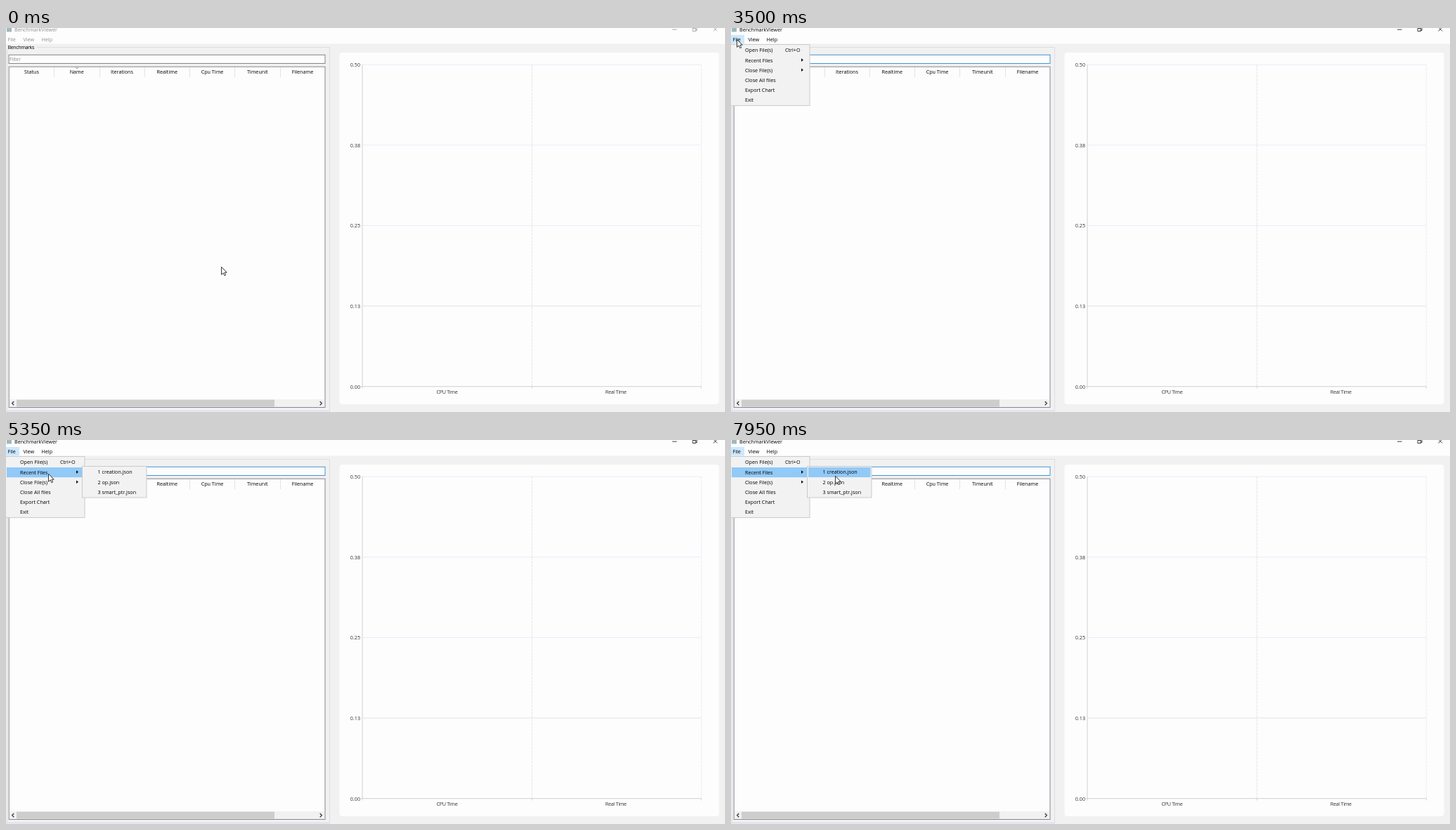
An HTML page that plays this animation: 1023 by 547 pixels, repeating every 8 s.

```html
<!DOCTYPE html>
<html lang="en">
<head>
<meta charset="utf-8">
<title>Benchmark window</title>
<style>
html, body { margin: 0; width: 100%; height: 100%; overflow: hidden; background: #f1f1f1; }
svg { display: block; width: 1023px; height: 547px; }
text { font: 7.2px "Open Sans", "Noto Sans", sans-serif; fill: #000; white-space: pre; }
.axis text { fill: #333; }
.mid { text-anchor: middle; }
</style>
</head>
<body>
<svg id="stage" viewBox="0 0 1023 547"></svg>
<script>
const NS = "http://www.w3.org/2000/svg";
const LOOP = 8000;
const stage = document.getElementById("stage");

function add(parent, tag, attrs, content) {
  const el = document.createElementNS(NS, tag);
  for (const key in attrs) el.setAttribute(key, attrs[key]);
  if (content) el.textContent = content;
  parent.appendChild(el);
  return el;
}
const group = (attrs = {}, parent = stage) => add(parent, "g", attrs);
const rect = (p, x, y, width, height, fill, more = {}) =>
  add(p, "rect", { x, y, width, height, fill, ...more });
const path = (p, d, stroke, more = {}) =>
  add(p, "path", { d, stroke, fill: "none", "stroke-width": 1, ...more });
const label = (p, x, y, text, more = {}) => add(p, "text", { x, y, ...more }, text);
const show = (el, on) => el.setAttribute("visibility", on ? "visible" : "hidden");

// Title bar and menu bar
rect(stage, 0, 0, 1023, 547, "#f1f1f1");
rect(stage, 0, 0, 1023, 22.5, "#fdfdfe");
const fileTab = rect(stage, 0, 10, 19, 12.5, "#cce8ff");
rect(stage, 1, 0, 7, 5.5, "#9fb9ba");
const barTexts = [
  label(stage, 12, 5, "BenchmarkViewer"),
  label(stage, 2.5, 19, "File"),
  label(stage, 24.5, 19, "View"),
  label(stage, 50.5, 19, "Help")
];
const buttons = path(stage,
  "M948 2.2h6.5M977 .5h4.5v4h-4.5zM978.5 .5v-1.5h4.5v4.5h-1.5M1006.5 -1l5.5 5.5M1012 -1l-5.5 5.5",
  "#999", { "stroke-width": .8 });

// Benchmark list
path(stage, "M44 27.5H460.5V545M1.5 30V545", "#dedee2");
path(stage, "M0 545.5H461", "#dcdcee", { "stroke-width": 1.5 });
label(stage, 2.5, 30.2, "Benchmarks", { "letter-spacing": "-.43" });
const field = rect(stage, 4, 38.3, 450, 12.2, "#fdfdfe");
label(stage, 5, 47.2, "Filter", { style: "fill:#8b8b8b;font-size:6.8px" });
rect(stage, 4.2, 55.2, 449.8, 485.3, "#fdfdfe", { stroke: "#858990" });
["Status", "Name", "Iterations", "Realtime", "Cpu Time", "Timeunit", "Filename"].forEach((name, i) => {
  const x = 36.5 + i * 64.25;
  label(stage, x, 65.2, name, { class: "mid" });
  if (i) path(stage, `M${Math.round(x - 32.5) + .5} 56V70`, "#e3e3e5");
});
path(stage, "M99 56.2l2 1.6l2 -1.6", "#777", { "stroke-width": .8 });
rect(stage, 5, 529, 448, 11, "#f1f1f1");
rect(stage, 15, 529.5, 367, 10, "#cdcdcd");
path(stage, "M11.3 532l-2.6 2.6l2.6 2.6M446.7 532l2.6 2.6l-2.6 2.6", "#333", { "stroke-width": 1.3 });

// Chart
rect(stage, 474.5, 35, 540, 501, "#fdfdfe", { rx: 4 });
const chart = group({ class: "axis" });
["0.50", "0.38", "0.25", "0.13", "0.00"].forEach((value, i) => {
  const y = 52.2 + i * 114.6;
  if (i < 4) path(chart, `M507 ${y}H989`, i === 3 ? "#e2e2e6" : "#ebebf8");
  label(chart, 504, y + 2.9, value, { "text-anchor": "end" });
});
path(chart, "M748.3 52V511", "#ebe7d6", { "stroke-dasharray": "4 1" });
path(chart, "M989.3 52V511", "#ededf2", { "stroke-dasharray": "4 1" });
path(chart, "M507 52V513.5M505 510.7H989.3M748.3 511V513.5M989.3 511V513.5", "#d0d0d3");
label(chart, 627.5, 520.5, "CPU Time", { class: "mid", "letter-spacing": "-.33" });
label(chart, 867.8, 520.5, "Real Time", { class: "mid", "letter-spacing": "-.28" });

// Menus
const ROW = 14.15;
const ARROW = "l3 2.3l-3 2.3z";

function menu(x, y, w, h, textX, items) {
  const g = group();
  rect(g, x + .5, y + .5, w - 1, h - 1, "#f2f2f2", { stroke: "#cbcbcd" });
  const bar = rect(g, x + 2, 0, w - 4, ROW, "#91c9f7");
  items.forEach((item, i) => label(g, textX, y + 11.4 + i * ROW, item));
  return { g, bar, top: y + 1.9, set(row) {
    show(bar, row >= 0 && g.getAttribute("visibility") === "visible");
    bar.setAttribute("y", this.top + row * ROW);
  } };
}
const main = menu(-1, 23, 113.5, 88, 20,
  ["Open File(s)", "Recent Files", "Close File(s)", "Close All files", "Export Chart", "Exit"]);
label(main.g, 77, 34.4, "Ctrl+O");
[43.3, 57.4].forEach(y => path(main.g, `M100 ${y}${ARROW}`, "none", { fill: "#111" }));
const recent = menu(108, 37, 92.5, 45.5, 130.5, ["1 creation.json", "2 op.json", "3 smart_ptr.json"]);

const pointer = path(stage, "M.5 .3V11.3L3.1 8.9L4.9 12.7L6.7 11.9L4.9 8.2H8.2Z", "#222",
  { fill: "#fff", "stroke-width": .9, "stroke-linejoin": "round" });

// Pointer stops: time, x, y
const stops = [
  [0, 306, 340], [100, 306, 340], [900, 313, 343], [1500, 323, 346], [2050, 323, 346],
  [2900, 13, 24], [3250, 8, 16], [3600, 8, 16], [4150, 24, 55], [4500, 26, 55],
  [4900, 45, 47], [5350, 60, 48], [5850, 112, 47], [6150, 131, 56], [6450, 135, 57],
  [6650, 135, 57], [7300, 150, 58], [7950, 148, 51], [8000, 148, 51]
];
const MENU_AT = 3450, RECENT_AT = 5000;

function place(t) {
  const i = stops.findIndex(s => s[0] > t);
  const [t0, x0, y0] = stops[i - 1], [t1, x1, y1] = stops[i];
  const u = (t - t0) / (t1 - t0), k = u * u * (3 - 2 * u);
  return [x0 + (x1 - x0) * k, y0 + (y1 - y0) * k];
}

function draw(t) {
  const [x, y] = place(t);
  const open = t >= MENU_AT, sub = t >= RECENT_AT;
  pointer.setAttribute("transform", `translate(${Math.round(x)} ${Math.round(y)})`);
  barTexts.forEach(el => { el.style.fill = open ? "#000" : "#8e8e8e"; });
  buttons.setAttribute("stroke", open ? "#111" : "#999");
  field.setAttribute("stroke", open ? "#4596d0" : "#85858c");
  show(fileTab, open);
  show(main.g, open);
  show(recent.g, sub);
  const inSub = sub && x > 110;
  const rowIn = m => y < m.top ? -1 : Math.floor((y - m.top) / ROW);
  main.set(inSub ? 1 : rowIn(main));
  recent.set(inSub ? rowIn(recent) : -1);
}

function tick(now) {
  draw(now % LOOP);
  requestAnimationFrame(tick);
}
draw(0);
requestAnimationFrame(tick);
</script>
</body>
</html>
```
